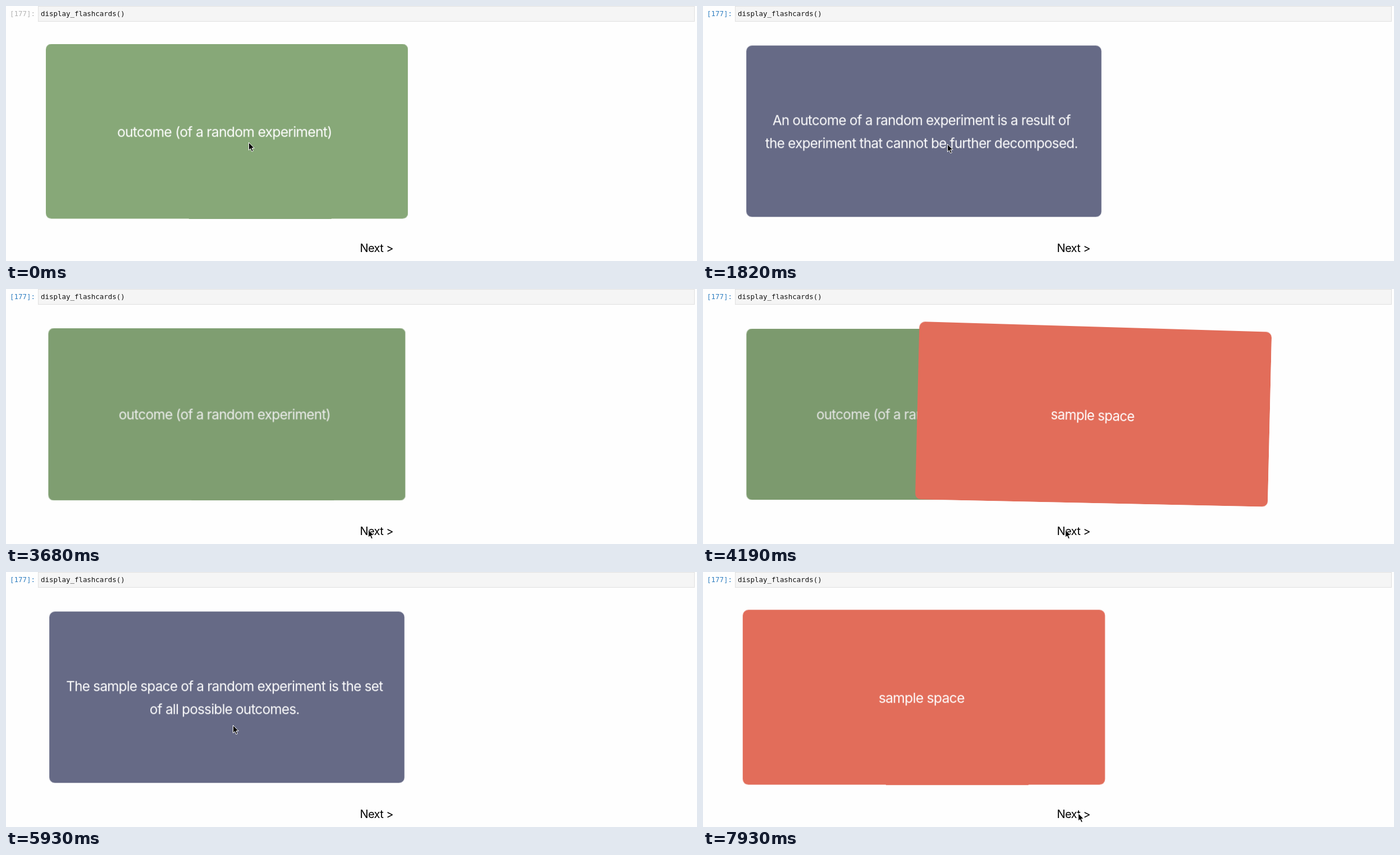
An HTML page that plays this animation: 1231 px wide and 455 px high, repeating every 8 s.

```html
<!DOCTYPE html>
<html lang="en">
<head>
<meta charset="utf-8">
<title>Flashcards</title>
<style>
html, body { margin: 0; width: 100%; height: 100%; overflow: hidden; background: #fefefe; }
#stage { position: relative; width: 1231px; height: 455px; overflow: hidden; font-optical-sizing: none; }

/* notebook input cell */
.prompt, .code {
  position: absolute; top: 0; box-sizing: border-box; height: 28px;
  font: 12.45px/27px "DejaVu Sans Mono", monospace; white-space: pre;
}
.prompt { left: 7px; color: #307fc1; animation: prompt 8s step-end infinite; }
.code {
  left: 57px; width: 1170px; padding-left: 4px; line-height: 26px;
  color: #111; background: #f5f5f5; border: 1px solid #e0e0e0;
}
@keyframes prompt { 0% { color: #b3b3b3; } 5.6%, 100% { color: #307fc1; } }

/* cards */
.output { position: absolute; left: 62px; top: 33px; width: 1165px; height: 422px; overflow: hidden; }
.slot { position: absolute; left: 11.7px; top: 36.2px; width: 638.5px; height: 309px; }
.scene { width: 100%; height: 100%; perspective: 1000px; }
.card { position: relative; width: 100%; height: 100%; transform-style: preserve-3d; }
.face {
  position: absolute; inset: 0; border-radius: 10px;
  display: flex; align-items: center; justify-content: center;
  backface-visibility: hidden; transform: translateZ(10px);
  color: #fff; font: 24.5px/41.4px Inter, sans-serif; letter-spacing: -.75px;
  text-align: center; white-space: nowrap;
}
.face span { position: relative; left: -4px; top: 1px; }
.back { background: #666a86; transform: translateZ(10px) rotateY(180deg); }
.green { background: #87a878; }
.red { background: #e26d5a; }

#first { animation: retire 8s infinite; }
#first .card { animation: flip-first 8s infinite; }
#second { animation: slide-in 8s infinite; }
#second .card { animation: flip-second 8s infinite; }

@keyframes flip-first {
  0%, 5.5% { transform: rotateY(0deg); }
  13%, 28.86% { transform: rotateY(180deg); }
  36.36%, 100% { transform: rotateY(0deg); }
}
@keyframes flip-second {
  0%, 66.4% { transform: rotateY(0deg); }
  73.9%, 91.5% { transform: rotateY(180deg); }
  99%, 100% { transform: rotateY(0deg); }
}
@keyframes retire {
  0%, 42.94% { transform: scale(1); filter: brightness(1); visibility: visible; }
  50.44%, 62.6% { transform: scale(.9802); filter: brightness(.915); visibility: visible; }
  62.61%, 100% { transform: scale(.9802); filter: brightness(.915); visibility: hidden; }
}
@keyframes slide-in {
  0%, 42.94% {
    transform: translate(1573px, 6.5px) perspective(10000px) rotateY(78deg) rotateZ(7.3deg) scale(1.04);
  }
  61.69%, 100% {
    transform: translate(0px, 0px) perspective(10000px) rotateY(0deg) rotateZ(0deg) scale(1);
  }
}

.next {
  position: absolute; left: 630.5px; top: 419px; color: #000;
  font: 20px/26px Inter, sans-serif; letter-spacing: -.6px; white-space: pre;
}

/* pointer */
.pointer {
  position: absolute; left: 0; top: 0; width: 14px; height: 20px; overflow: visible;
  animation: point 8s ease-in-out infinite;
}
@keyframes point {
  0%, 5.6% { transform: translate(432px, 243px); }
  13.7%, 22.8% { transform: translate(435px, 246px); }
  26.5%, 29% { transform: translate(468px, 276px); animation-timing-function: ease-in; }
  35% { transform: translate(601px, 401px); animation-timing-function: ease-out; }
  39.4%, 40% { transform: translate(641px, 429px); }
  40.9%, 53.4% { transform: translate(645px, 429px); }
  62.9%, 79.5% { transform: translate(404px, 273px); }
  87% { transform: translate(676px, 432px); }
  89.8%, 100% { transform: translate(668px, 430px); }
}
</style>
</head>
<body>
<div id="stage">
  <div class="prompt">[177]:</div>
  <div class="code">display_flashcards()</div>

  <div class="output">
    <div class="slot" id="first"><div class="scene"><div class="card">
      <div class="face green"><span>outcome (of a random experiment)</span></div>
      <div class="face back"><span>An outcome of a random experiment is a result of<br>the experiment that cannot be further decomposed.</span></div>
    </div></div></div>
    <div class="slot" id="second"><div class="scene"><div class="card">
      <div class="face red"><span>sample space</span></div>
      <div class="face back"><span>The sample space of a random experiment is the set<br>of all possible outcomes.</span></div>
    </div></div></div>
  </div>

  <div class="next">Next &gt;</div>

  <svg class="pointer" viewBox="0 0 14 20">
    <path d="M.5 .5V14.2L3.6 11.4L5.9 16.7L8.3 15.7L6 10.5H10.2Z"
      fill="#000" stroke="#fff" stroke-width="1" stroke-linejoin="round"/>
  </svg>
</div>
</body>
</html>
```
